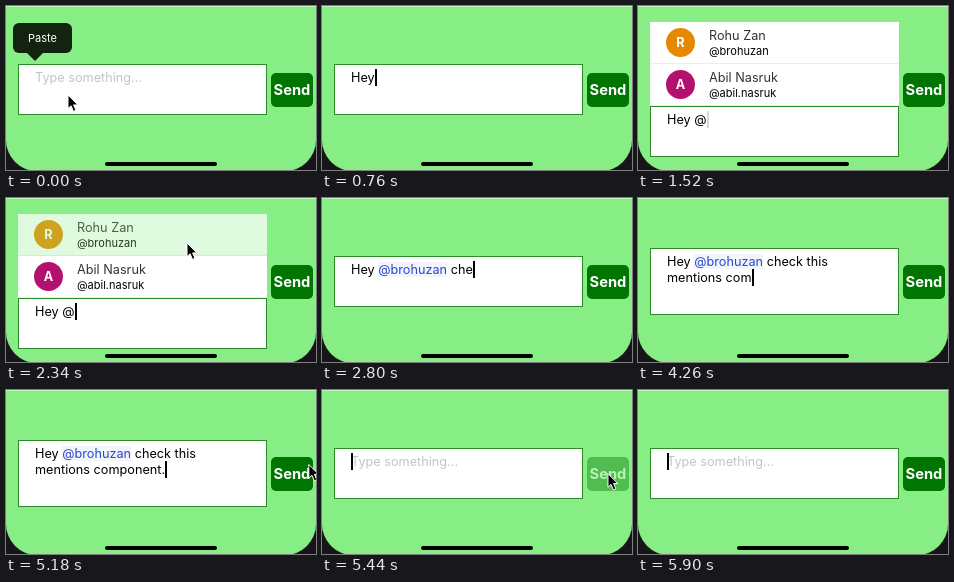
Animation, 310 px wide and 164 px high, one loop 5980 ms. Source, as an HTML page:

```html
<!DOCTYPE html>
<html lang="en">
<head>
<meta charset="utf-8">
<title>Mentions input</title>
<style>
html, body { margin: 0; width: 100%; height: 100%; overflow: hidden; background: #171517; }
body { position: relative; font: 12.7px/16px Inter, "Liberation Sans", sans-serif; color: #000; }
#screen {
  position: absolute; left: 0; top: 0; width: 310px; height: 165px;
  background: #87ed85; border-radius: 0 0 31px 31px; box-shadow: inset 0 1px #b9f5b7;
}
#column {
  position: absolute; left: 12px; top: 0; width: 249px; height: 167px;
  display: flex; flex-direction: column; justify-content: center;
}
#list { flex: none; }
.row { position: relative; height: 42px; background: #fff; box-shadow: inset 0 -1px #ececec; }
.row * { position: absolute; white-space: nowrap; }
.row b {
  left: 16px; top: 6px; width: 29px; height: 29px; border-radius: 50%;
  color: #fff; line-height: 29px; text-align: center;
}
.row span { left: 59px; top: 6px; color: #333; }
.row small { left: 59px; top: 21px; font-size: 11px; }
#input {
  flex: none; box-sizing: border-box; padding: 5px 15px 28px 16px;
  border: 1px solid #2a8d2a; background: #fff; white-space: pre-wrap;
}
#hint { color: #c4c4c6; }
.mention { color: #2b49c8; background: #f3f5fd; }
#caret { position: relative; }
#caret::after { content: ""; position: absolute; left: 0; top: -1px; width: 2px; height: 17px; background: #000; }
#send {
  position: absolute; left: 265px; top: 67px; width: 42px; height: 33.5px; border-radius: 5px;
  background: #017501; color: #fff; font-weight: 700; font-size: 14.7px; line-height: 34px; text-align: center;
}
#home { position: absolute; left: 99px; top: 156px; width: 112px; height: 4px; border-radius: 2px; background: #000; }
#paste {
  position: absolute; left: 7px; top: 17px; width: 59px; height: 30px; border-radius: 6px;
  background: #12240f; color: #fff; font-size: 11px; line-height: 31px; text-align: center;
}
#paste::after {
  content: ""; position: absolute; left: 14px; top: 30px;
  border: solid transparent; border-width: 8px 8px 0; border-top-color: #12240f;
}
#mouse { position: absolute; left: -1px; top: -1px; }
</style>
</head>
<body>
<div id="screen">
  <div id="column">
    <div id="list">
      <div class="row" id="pick"><b style="background:#e58a00">R</b><span>Rohu Zan</span><small>@brohuzan</small></div>
      <div class="row"><b style="background:#b3116f">A</b><span>Abil Nasruk</span><small>@abil.nasruk</small></div>
    </div>
    <div id="input"><span id="text"></span><i id="caret"></i><span id="hint">Type something...</span></div>
  </div>
  <div id="send">Send</div>
  <div id="home"></div>
  <div id="paste">Paste</div>
</div>
<svg id="mouse" width="14" height="20" viewBox="-1 -1 14 20">
  <path d="M0 0V13.6L3.1 10.8L5.5 16.4L8 15.3L5.6 9.9H9.8Z" fill="#000" stroke="#fff" stroke-width="1"/>
</svg>
<script>
const LOOP = 5980, LIST_OPEN = 1120, PICK = 2400, RESET = 5400;
const MENTION = '@brohuzan';
const ui = Object.fromEntries(
  [...document.querySelectorAll('[id]')].map(e => [e.id, e]));

// Text typed evenly from start to end
const typing = [
  { start: 120, end: 160, text: 'He' },
  { start: 760, end: 840, text: 'y ' },
  { start: 1080, text: '@' },
  { start: PICK, text: MENTION.slice(1) + ' ' },
  { start: 2600, end: 3220, text: 'check this' },
  { start: 3500, text: ' ' },
  { start: 3680, end: 4260, text: 'mentions com' },
  { start: 4320, end: 4720, text: 'ponent' },
  { start: 5000, text: '.' }
];

// Pointer visible from show to hide, gliding from go to stop
const glides = [
  { show: 0, go: 380, stop: 440, hide: 460, from: [62, 89], to: [70, 89] },
  { show: 1740, go: 1740, stop: 2260, hide: PICK, from: [196, -18], to: [181, 45] },
  { show: 5080, go: 5080, stop: 5300, hide: 5420, from: [316, 67], to: [286, 84] },
  { show: 5420, go: 5420, stop: 5840, hide: 5860, from: [286, 84], to: [281, 31] }
];

const ramp = (t, a, b) => Math.min(1, Math.max(0, (t - a) / (b - a)));
const smooth = p => p * p * (3 - 2 * p);

// The text so far and the time of the last key
function typed(t) {
  if (t >= RESET) return { text: '', last: RESET };
  let text = '', last = 0;
  for (const { start, end = start, text: part } of typing) {
    if (t < start) break;
    const gap = (end - start) / Math.max(1, part.length - 1);
    const n = gap ? Math.min(part.length, Math.floor((t - start) / gap + 1e-6) + 1) : part.length;
    text += part.slice(0, n);
    last = start + gap * (n - 1);
  }
  return { text, last };
}

function blink(idle) {
  const s = idle % 530;
  return 1 - ramp(s, 240, 320) + ramp(s, 430, 500);
}

let shown = null;
function setText(text) {
  if (text === shown) return;
  shown = text;
  ui.text.innerHTML = text.replace(MENTION, `<span class="mention">${MENTION}</span>`);
  ui.hint.style.display = text ? 'none' : '';
}

function moveMouse(t) {
  const g = glides.find(g => t >= g.show && t < g.hide);
  ui.mouse.style.display = g ? '' : 'none';
  if (!g) return;
  const p = smooth(ramp(t, g.go, g.stop));
  const [x, y] = g.from.map((v, i) => v + (g.to[i] - v) * p);
  ui.mouse.style.transform = `translate(${x}px, ${y}px)`;
}

function draw(t) {
  const { text, last } = typed(t);
  setText(text);
  moveMouse(t);
  ui.list.style.display = t >= LIST_OPEN && t < PICK ? '' : 'none';
  ui.caret.style.opacity = last ? blink(t - last) : 0;
  ui.paste.style.opacity = 1 - ramp(t, 90, 160);
  ui.pick.style.opacity = 1 - 0.5 * ramp(t, 2280, PICK);
  ui.send.style.opacity = 1 - 0.6 * (ramp(t, 5310, 5390) - ramp(t, 5460, 5660));
}

const begin = performance.now();
function tick() {
  draw((performance.now() - begin) % LOOP);
  requestAnimationFrame(tick);
}
tick();
</script>
</body>
</html>
```
